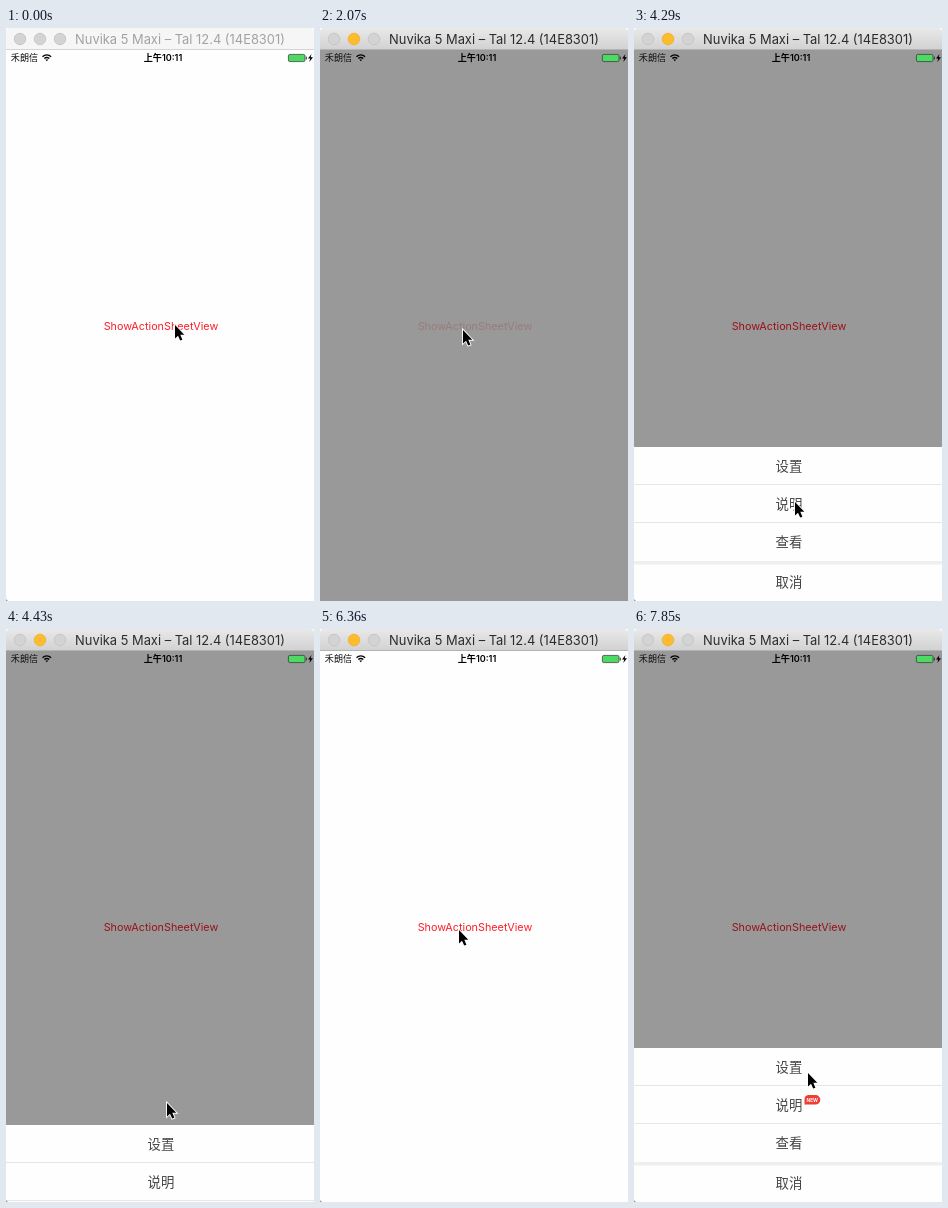
Animation, 308 px wide and 573 px high, one loop 7.99 s. Source, as an HTML page:

```html
<!DOCTYPE html>
<html lang="zh-CN">
<head>
<meta charset="utf-8">
<title>Action sheet</title>
<style>
html, body { margin: 0; width: 100%; height: 100%; overflow: hidden; background: #fff; }
svg { display: block; width: 308px; height: 573px; font-family: Inter, "Noto Sans CJK SC", "Noto Sans CJK", sans-serif; }
text { text-anchor: middle; }
#lights circle { fill: #d3d3d3; stroke: #c2c2c2; stroke-width: .8; }
#sheet text { font-size: 13.4px; fill: #444; }
#sheet #new { font-size: 4.8px; font-weight: 700; fill: #fff; }
.active #bar { fill: url(#metal); }
.active #title { fill: #2c2c2c; }
.active #edge { fill: #b4b4b4; }
.active #lights #mid { fill: #fdbc2e; stroke: #f0ae2c; }
</style>
</head>
<body>
<svg id="stage" viewBox="0 0 308 573">
  <defs>
    <linearGradient id="metal" x2="0" y2="1">
      <stop stop-color="#e9e9e9"/><stop offset="1" stop-color="#d1d1d1"/>
    </linearGradient>
  </defs>
  <rect width="308" height="573" fill="#fefefe"/>
  <text id="button" x="155" y="302" font-size="10.8" fill="#fd1f2a">ShowActionSheetView</text>
  <rect id="dim" y="22" width="308" height="551" opacity=".4"/>

  <g id="sheet">
    <rect y="419" width="308" height="154" fill="#fefefe"/>
    <path d="M0 456.5H308M0 494.5H308" stroke="#e6e6e6"/>
    <rect y="533" width="308" height="3.5" fill="#efefef"/>
    <text x="155" y="442.5">设置</text>
    <text x="155" y="480.5">说明</text>
    <text x="155" y="518.5">查看</text>
    <text x="155" y="559">取消</text>
    <g id="badge">
      <path d="M174.5 466H181.5a4.8 4.8 0 0 1 0 9.6H170.5V470.5a4.3 4.5 0 0 1 4-4.5Z" fill="#f03c32"/>
      <text id="new" x="178.3" y="472.6">NEW</text>
    </g>
  </g>

  <g font-size="9.1">
    <text x="18.5" y="33" fill="#111">禾朗信</text>
    <text x="157" y="33" font-weight="600">上午10:11</text>
  </g>
  <path d="M36.5 28.7a6.2 6.2 0 0 1 8.6 0M38.3 30.6a3.7 3.7 0 0 1 5 0" fill="none" stroke="#000" stroke-width="1.3"/>
  <path d="M39.3 31.5L40.8 33.2L42.3 31.5Z"/>
  <rect x="282.4" y="26.4" width="16.6" height="7.2" rx="1.5" fill="#4cd964" stroke="#333" stroke-width=".7"/>
  <rect x="299.8" y="28.5" width="1" height="3" rx=".5" fill="#333"/>
  <path d="M305.5 26L302 30.6H304.2L303.3 34L307 29.3H304.7Z"/>

  <rect id="bar" width="308" height="22" fill="#f6f6f6"/>
  <rect id="edge" y="21" width="308" height="1" fill="#d4d4d4"/>
  <path d="M0 0H4A4 4 0 0 0 0 4ZM308 0H304A4 4 0 0 1 308 4Z" fill="#fff"/>
  <g id="lights">
    <circle cx="14" cy="11" r="5.8"/><circle id="mid" cx="34" cy="11" r="5.8"/><circle cx="54" cy="11" r="5.8"/>
  </g>
  <text id="title" x="174" y="16" font-size="12.9" fill="#a2a2a2">Nuvika 5 Maxi – Tal 12.4 (14E8301)</text>
  <path d="M0 571V573H2Z" fill="#999"/>

  <g id="cursor">
    <path d="M1 1V14.5L4 11.7L6.2 16.6L8.4 15.7L6.3 10.8H10.3Z" stroke="#fff" stroke-width="1.8" paint-order="stroke"/>
  </g>
</svg>
<script>
const $ = id => document.getElementById(id);
const LOOP = 7990, START = 734, TICK = 147.76;
const clamp = u => Math.min(1, Math.max(0, u));
const between = (n, a, b) => n >= a && n < b;

// Resting points of the pointer
const title = [168, 296], press = [142, 301], row = [160, 473], again = [138, 300], end = [173, 443];

// Each move is a cubic curve that begins at a tick and lasts some ticks
const moves = [
  { at: 0, ticks: 8, path: [title, [255, 395], [45, 205], press] },
  { at: 15, ticks: 6, path: [press, [146, 311], [165, 470], row] },
  { at: 31, ticks: 8, path: [row, [174, 522], [15, 60], again] },
  { at: 47, ticks: 2, path: [again, again, end, end] }
];

function bezier([a, b, c, d], u) {
  const v = 1 - u;
  return [0, 1].map(k => v * v * v * a[k] + 3 * v * v * u * b[k] + 3 * v * u * u * c[k] + u * u * u * d[k]);
}

function pointer(n) {
  const move = moves.findLast(m => m.at <= n) || moves[0];
  return bezier(move.path, clamp((n - move.at + 1) / move.ticks));
}

// Visible share of the sheet: up, down, up again
function sheetShare(n) {
  const slide = from => clamp((n - from) / 2);
  return slide(9) - slide(24) + slide(44);
}

function show(id, on) {
  $(id).style.display = on ? "" : "none";
}

function draw(time) {
  const n = Math.max(-1, Math.floor((time % LOOP - START) / TICK));
  const share = sheetShare(n);
  const pressed = between(n, 8, 10) || between(n, 43, 45);
  $("stage").classList.toggle("active", n >= 8);
  $("button").setAttribute("opacity", pressed ? .22 : 1);
  show("dim", between(n, 9, 26) || n >= 44);
  show("sheet", share > 0);
  show("badge", !between(n, 23, 44));
  $("sheet").setAttribute("transform", `translate(0 ${154 * (1 - share)})`);
  $("cursor").setAttribute("transform", `translate(${pointer(n)})`);
}

const t0 = performance.now();
function frame() {
  draw(performance.now() - t0);
  requestAnimationFrame(frame);
}
frame();
</script>
</body>
</html>
```
